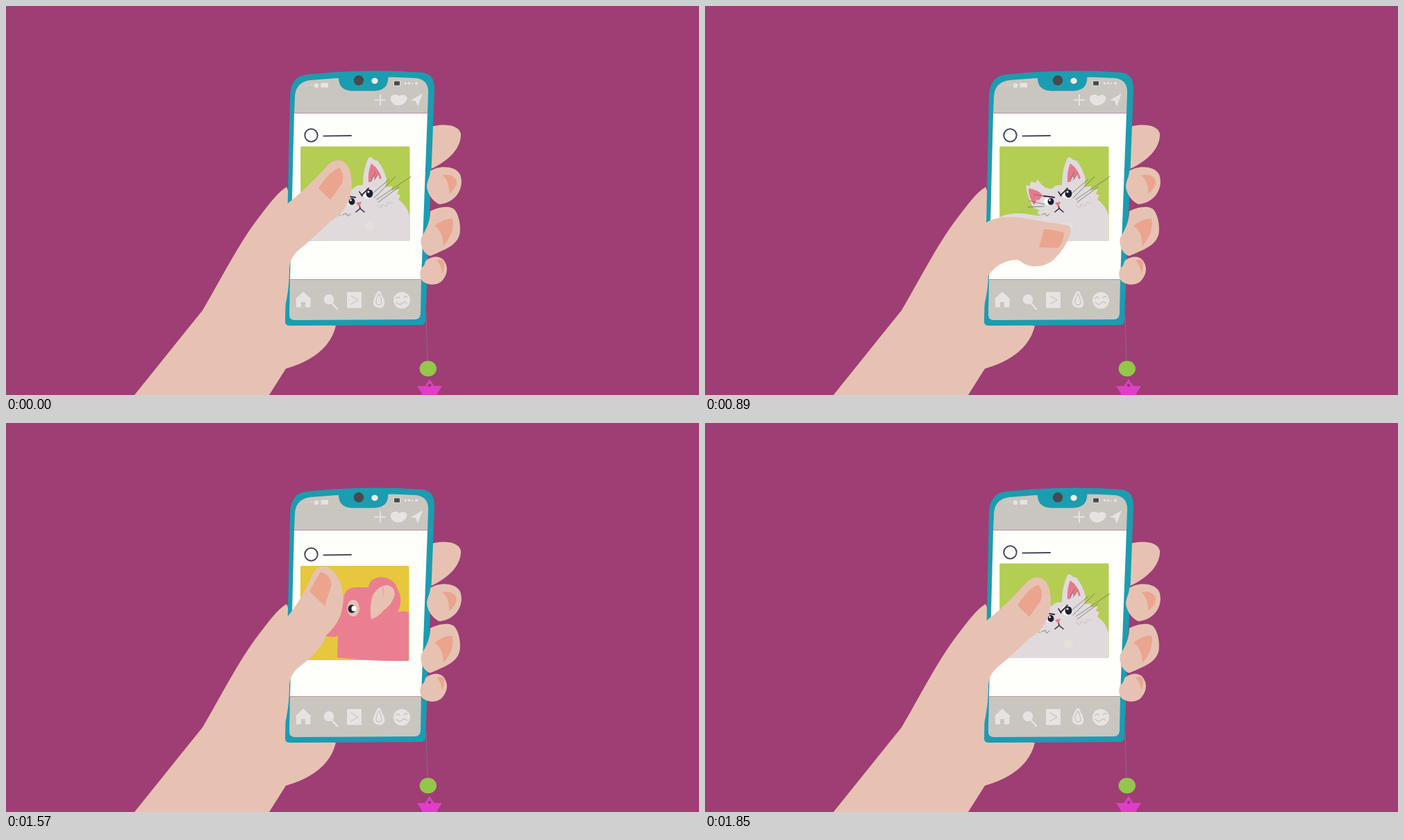
Animation, 998 px wide and 561 px high, one loop 1890 ms. Source, as an HTML page:

```html
<!DOCTYPE html>
<html lang="en">
<head>
<meta charset="utf-8">
<title>Scrolling the feed</title>
<style>
  html, body { margin: 0; width: 100%; height: 100%; overflow: hidden; background: #9e3e74; }
  svg { display: block; width: 100vw; height: 100vh; }
  .skin { fill: #e7c2b3; }
  .nail { fill: #eba58e; }
  .teal { fill: #1c9cb0; }
  .bar { fill: #c9c6c0; }
  .icon { fill: #e6e3e2; }
  .line { fill: none; stroke-linecap: round; stroke-linejoin: round; }
  .ink { stroke: #474a5c; stroke-width: 2; }
  .cut { stroke: #c9c6c0; stroke-width: 1.4; }
  .hair { stroke: #6c6a66; stroke-width: .8; }
</style>
</head>
<body>
<svg viewBox="0 0 998 561">
  <defs>
    <clipPath id="screen"><path d="M415 155H607L598 394H409Z"/></clipPath>

    <g id="header" class="line ink">
      <circle cx="439.5" cy="186.5" r="9.2"/>
      <path d="M457.500 187.500L497 187"/>
    </g>

    <g id="cat">
      <use href="#header"/>
      <rect x="424.200" y="202.500" width="157.300" height="136.500" rx="2" fill="#b4cd53"/>
      <path fill="#e0dadd" d="M425 304Q445 296 470 301L484 303L478 298L482 295L473 291Q464 277 462 258L467 260L470 253L476 255L479 250L484 257L490 262L499 264L505 259L514 258Q514 236 522 219L526 218L530 222L535 223Q545 236 548 250L546 261L556 260L555 266L566 264L563 271L568 273L565 279Q577 287 581 302V339H425Z"/>
      <path fill="#e6798c" d="M526 227Q538 235 542 252L522 254Q521 239 526 227ZM466 263Q481 265 487 274L474 287Q466 276 466 263Z"/>
      <path fill="#e0dadd" d="M526 255L529 246L532 250L536 242L538 250L543 247L544 257ZM474 288L478 279L481 281L485 274L491 277Z"/>
      <g fill="#fbfafa">
        <ellipse cx="495" cy="281.500" rx="7" ry="6"/>
        <ellipse cx="521.500" cy="270.500" rx="8" ry="7"/>
      </g>
      <g fill="#1d2033">
        <ellipse cx="498" cy="282" rx="4.500" ry="5"/>
        <ellipse cx="523.500" cy="270.500" rx="5" ry="6"/>
      </g>
      <g fill="#fff">
        <circle cx="496.500" cy="280" r="1.400"/>
        <circle cx="522" cy="268" r="1.600"/>
      </g>
      <path class="line" stroke="#33283a" stroke-width="2" d="M488 274L503 276M512 273L522 263"/>
      <path class="line" stroke="#33283a" stroke-width="1.600" d="M504 297L510 292L516 297M509 287L510 292M509 268L513 274"/>
      <path fill="#e6798c" d="M504 284L512 282L509 290Z"/>
      <path class="line hair" d="M530 277L561 246M534 279L583 246M536 283L566 261M528 270L552 250M489 286L467 281M488 289L465 290M474 272L487 274M485 301L490 299L492 303L496 300M526 250L532 240M530 251L537 241"/>
      <path class="line" stroke="#c9c2c8" stroke-width="1" d="M534 288L540 291L541 286L548 289L550 283L557 285"/>
      <ellipse cx="523" cy="318" rx="7" ry="6.500" fill="#e4e0d8"/>
    </g>

    <g id="elephant">
      <use href="#header"/>
      <rect x="424" y="203" width="156.500" height="136" rx="2" fill="#e7c73d"/>
      <path fill="#ea7f91" d="M487 245Q492 233 505 234L522 234Q523 221 540 219Q559 221 563 235Q571 247 567 263L564 270Q572 267 580 270V340Q530 341 477 335L478 304Q470 308 458 303L466 292Q481 284 484 266Z"/>
      <path fill="#e7c2b3" d="M528 246Q536 231 550 231Q560 234 560 244Q556 259 545 266Q536 277 526 280Q523 262 528 246Z"/>
      <path class="line" stroke="#cf9fae" stroke-width="1" d="M543 234V247"/>
      <ellipse cx="500" cy="264" rx="9" ry="12" fill="#e7c2b3"/>
      <ellipse cx="498" cy="265" rx="5.500" ry="6" fill="#20283a"/>
      <ellipse cx="501" cy="264.500" rx="3.500" ry="4" fill="#fff"/>
    </g>

    <g id="geese">
      <use href="#header"/>
      <rect x="423.500" y="203" width="157.500" height="136" rx="1" fill="#04a4cb"/>
      <path fill="#dcdfd6" d="M424 328Q432 303 455 288L454 236Q456 219 470 218Q483 222 484 242L481 260L483 285Q505 293 528 302C527 290 537 283 537 268L529 256Q534 244 546 244Q561 247 560 263Q555 284 555 304Q568 307 580.500 319V339H424Z"/>
      <path fill="#ecc440" d="M470 253Q474 243 481 244Q494 254 502 268L497 272Q481 266 470 257ZM512 257Q522 255 532 258L539 266Q532 274 524 280L514 273Z"/>
      <path class="line" stroke="#8a7428" stroke-width="1.200" d="M474 254L499 269M514 262Q526 262 534 270"/>
      <path class="line" stroke="#2c3040" stroke-width="2.600" d="M460 245Q462 240 467 244M545 261Q549 255 551 265"/>
    </g>
  </defs>

  <rect width="998" height="561" fill="#9e3e74"/>

  <!-- charm -->
  <path class="line" stroke="#8a6a84" d="M605 445L607 513"/>
  <ellipse cx="607.800" cy="523" rx="12.200" ry="11.300" fill="#93c64b"/>
  <path fill="#e03ec6" d="M610 538L616.500 548H628L621 559L625 570H595L599 559L592 548H603.500Z"/>
  <circle cx="610" cy="547" r="2.300" fill="#97308a"/>

  <!-- arm and rear finger -->
  <path class="skin" d="M185 561L283 439C308 397 334 344 364 305C380 284 391 269 404 261L420 300L440 455L475 461C469 488 446 511 403 523L379 561Z"/>
  <path class="skin" d="M605 176C625 169 651 169 655 184C656 203 640 224 605 238Z"/>

  <!-- phone -->
  <path class="teal" d="M409 130Q410 102 432 99Q515 90 600 96Q618 98 617 122L604 455Q603 460 598 460L409 461Q402 461 402 455Z"/>
  <path class="bar" d="M416 133Q416 110 438 107Q510 100 590 104Q609 106 608 126L607 155H415Z"/>
  <path class="teal" d="M479 98C478 114 483 122 500 122.500H530C546 122 552 113 550 98Z"/>
  <circle cx="508" cy="107.300" r="7.200" fill="#4a494b"/>
  <ellipse cx="531" cy="108" rx="4.700" ry="4.200" fill="#f1ede3"/>
  <path fill="#fefefa" d="M415 155H607L598 394H409Z"/>
  <path class="bar" d="M409 394H598L597 444Q596 452 589 452L416 453Q408 453 408 445Z"/>

  <!-- status and top icons -->
  <g class="icon">
    <circle cx="447" cy="114.700" r="3.300"/>
    <rect x="453.500" y="111" width="10.500" height="6.500"/>
    <path d="M431 114h2v2h-2zM435 113h2v2h-2zM439 112h2v3h-2z" opacity=".4"/>
    <path d="M574 110h3v3h-3zM579 110h3v3h-3zM584 111h2v2h-2z"/>
    <circle cx="591" cy="111.500" r="2"/>
    <rect x="558" y="107.500" width="10" height="8"/>
    <path d="M566 130C574 125 581 131 576 137C573 143 563 145 559 142C552 138 552 129 559 128Q564 127 566 130Z"/>
    <path d="M600 126L583 136L590 137L593 145Z"/>
  </g>
  <rect x="559" y="108.500" width="8" height="6" fill="#4a494b"/>
  <path class="line" stroke="#e6e3e2" stroke-width="2" d="M531.500 135.500H546M539 128V143"/>

  <!-- bottom icons -->
  <g class="icon">
    <path d="M428 412L440 423H438.500V434.500H431V427H425V434.500H418V423H416.500Z"/>
    <circle cx="465" cy="423" r="7.300"/>
    <rect x="491" y="412.500" width="21" height="23"/>
    <path d="M536 411Q540 410 541 417Q546 424 545 431Q542 437 536 435Q528 434 529 426Q531 417 536 411Z"/>
    <circle cx="570" cy="424.500" r="12"/>
  </g>
  <path class="line" stroke="#e6e3e2" stroke-width="2.500" d="M469 428L477 437"/>
  <path class="line cut" d="M497 418L507 424L497 430M537 415Q531 426 534 430Q538 433 541 429Q541 422 537 415M562 422Q564 418 567 421M573 421Q576 417 578 420M562 427Q567 433 571 428Q575 425 577 429"/>

  <!-- feed -->
  <g clip-path="url(#screen)">
    <g id="feed">
      <use href="#cat"/>
      <use href="#elephant" y="269"/>
      <use href="#geese" y="538"/>
      <use href="#cat" y="807"/>
    </g>
    <path id="heart" fill="#e03ec6" d="M0 10C-8 4 -13 -1 -11 -6C-8 -11 -2 -9 0 -4C3 -10 10 -10 11.500 -5C12 1 6 5 0 10Z"/>
  </g>
  <path class="line" stroke="#b98a9c" stroke-width=".9" d="M415 154.500H607M409 394.500H598"/>

  <!-- front fingers -->
  <g class="skin">
    <path d="M611 238C621 230 647 229 654 243C661 262 648 284 624 286C613 281 606 268 606 259C607 251 611 246 611 238Z"/>
    <path d="M611 296C622 290 641 286 647 295C653 304 655 318 653.500 328C650 346 630 352 611 360.500C600 357 596 343 598 334C604 324 611 312 611 296Z"/>
    <path d="M604 368C612 360 627 359 632 369C638 379 634 389 629 395C623 403 609 404 600 397C595 391 596 383 598 378Q603 375 604 368Z"/>
  </g>
  <g class="nail">
    <path d="M628 244Q642 241 648 250Q652 260 638 271Q639 253 628 244Z"/>
    <path d="M617 317Q632 305 643 307Q647 326 630 346Q629 324 617 317Z"/>
    <path d="M620 367Q629 364 631 370Q631 380 628 386Q627 373 620 367Z"/>
  </g>

  <path id="thumb" class="skin"/>
  <path id="nail" class="nail"/>
</svg>

<script>
  const LOOP = 1890, HOLD = 410, STEP = 40;
  const $ = id => document.getElementById(id);

  // Thumb outline | nail, all built from the same commands
  const up = 'M404 286C425 270 447 248 462 231C474 217 494 219 497 246C501 275 490 297 468 310C455 322 440 337 426 348C414 357 409 366 408 378|M450 263Q464 240 480 233Q489 245 483 257L467 280Z';
  const side = 'M404 309C420 299 445 294 470 297C495 296 512 291 522 294C530 298 520 330 501 347C488 358 468 364 455 357C435 360 414 370 408 388|M484 305Q499 304 514 301Q515 318 508 328L482 331Z';
  const low = 'M404 313C418 303 445 302 470 308C490 312 510 313 524 317C533 321 519 350 502 366C488 378 466 379 453 367C440 364 420 371 408 389|M488 322Q502 322 517 327Q517 340 508 349L481 348Z';
  const high = 'M404 281C418 264 431 243 440 222C447 200 470 202 481 228C489 250 488 284 461 306C456 322 442 336 427 348C414 357 409 366 408 378|M437 243Q446 225 453 215Q467 218 469 233L459 264Z';
  const palm = 'C408 400 406 417 401 437L385 430V310Z';

  const lerp = (a, b, p) => a + (b - a) * p;
  const morph = (a, b, p) => {
    const to = b.match(/[\d.]+/g);
    let i = 0;
    return a.replace(/[\d.]+/g, n => lerp(+n, +to[i++], p).toFixed(1));
  };

  const thumbKeys = [
    [410, up], [650, side], [850, low], [1090, low], [1410, morph(side, low, .8)],
    [1450, morph(side, low, .7)], [1570, high], [1650, morph(high, up, .32)], [1850, up]
  ];
  const scrollKeys = [
    [1450, 0], [1490, 45], [1530, 135], [1570, 266], [1610, 455], [1650, 615],
    [1690, 705], [1730, 757], [1770, 786], [1810, 802], [1850, 807]
  ];
  const heartKeys = [[970, 0], [1090, 1], [1170, 1.4], [1270, 1.4], [1390, 0]];

  function at(keys, t, mix) {
    const i = keys.findIndex(k => k[0] > t);
    if (i === 0) return keys[0][1];
    if (i < 0) return keys[keys.length - 1][1];
    const [t0, a] = keys[i - 1], [t1, b] = keys[i];
    return mix(a, b, (t - t0) / (t1 - t0));
  }

  function draw(now) {
    const time = now % LOOP;
    // Long hold, then 25 pictures a second
    const t = time < HOLD ? 0 : HOLD + Math.floor((time - HOLD) / STEP) * STEP;
    const [outline, nail] = at(thumbKeys, t, morph).split('|');
    $('thumb').setAttribute('d', outline + palm);
    $('nail').setAttribute('d', nail);
    $('feed').setAttribute('transform', `translate(0 ${-at(scrollKeys, t, lerp)})`);
    $('heart').setAttribute('transform', `translate(500 277) scale(${at(heartKeys, t, lerp)})`);
  }

  const start = performance.now();
  function tick() {
    draw(performance.now() - start);
    requestAnimationFrame(tick);
  }
  tick();
</script>
</body>
</html>
```
